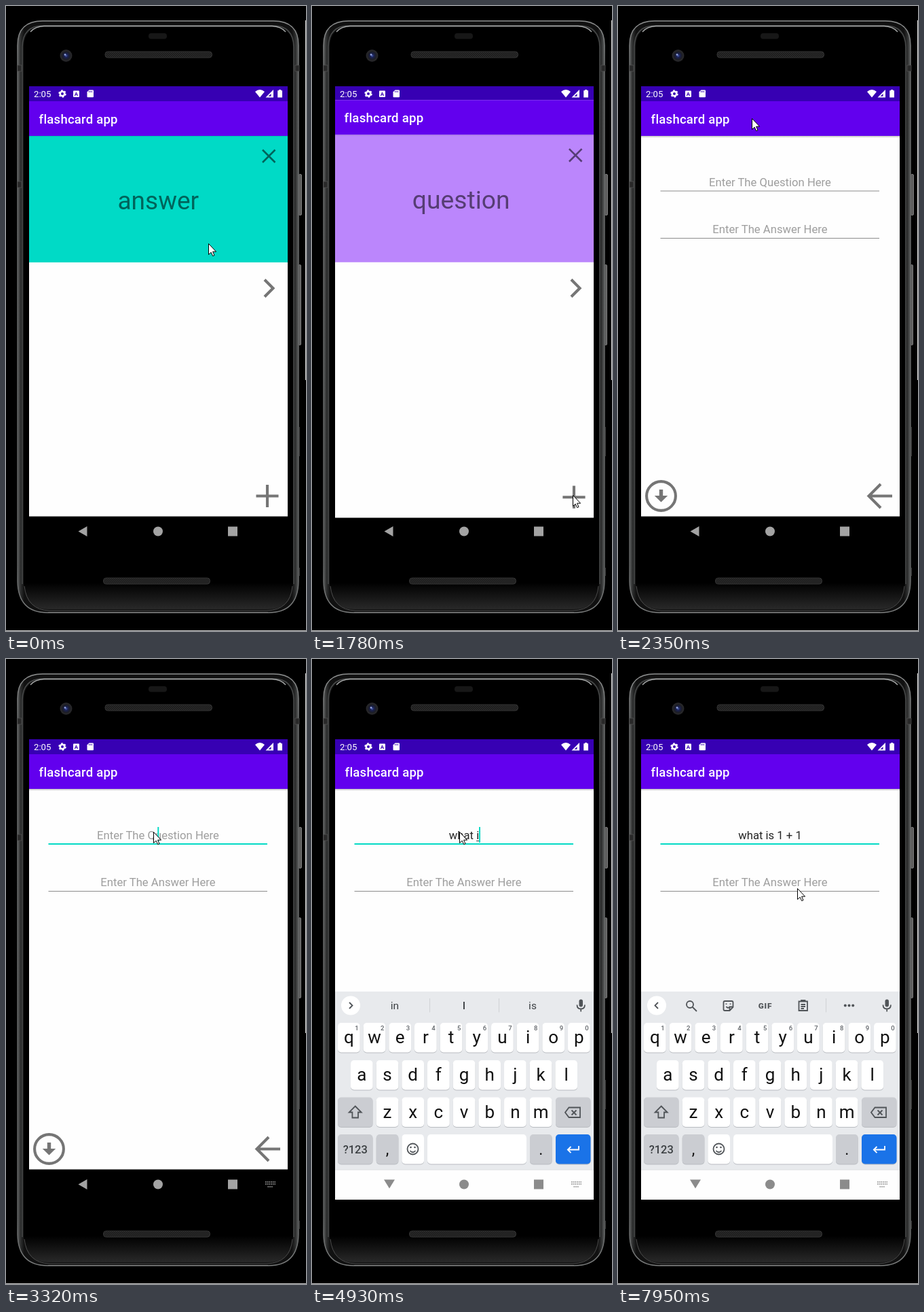
These frames come from a looping animation (442x919 px, 8000 ms). An HTML page:

```html
<!DOCTYPE html>
<html lang="en">
<head>
<meta charset="utf-8">
<title>Flashcard app</title>
<style>
html, body { margin: 0; width: 100%; height: 100%; overflow: hidden; background: #000; }
svg { display: block; width: 442px; height: 919px; font-family: Roboto, sans-serif; }
.mid { text-anchor: middle; }
.line { fill: none; stroke: #757575; stroke-width: 4.1; }
.glyph { fill: none; stroke: #505458; stroke-width: 1.8; }
.hint { font-size: 16.67px; fill: #9e9e9e; }
</style>
</head>
<body>
<svg viewBox="0 0 442 919">
  <defs>
    <clipPath id="screen"><path d="M34 118H415V795H34Z"/></clipPath>
    <clipPath id="appClip"><path d="M34 118H415V764H34Z"/></clipPath>
    <linearGradient id="shell">
      <stop offset="0" stop-color="#5a5c5c"/><stop offset=".012" stop-color="#2b2c2c"/>
      <stop offset=".024" stop-color="#111"/><stop offset=".976" stop-color="#111"/>
      <stop offset=".988" stop-color="#2b2c2c"/><stop offset="1" stop-color="#5a5c5c"/>
    </linearGradient>
    <linearGradient id="rim" x1="0" x2="0" y1="0" y2="1">
      <stop offset="0" stop-color="#8d8f8f"/><stop offset=".08" stop-color="#666868"/>
      <stop offset=".92" stop-color="#5c5e5e"/><stop offset="1" stop-color="#7c7e7e"/>
    </linearGradient>
    <linearGradient id="chin" x1="0" x2="0" y1="0" y2="1">
      <stop offset="0" stop-color="#000"/><stop offset="1" stop-color="#292929"/>
    </linearGradient>
    <linearGradient id="shade" x1="0" x2="0" y1="0" y2="1">
      <stop offset="0" stop-opacity=".25"/><stop offset="1" stop-opacity="0"/>
    </linearGradient>
    <radialGradient id="lens">
      <stop offset="0" stop-color="#4a5fb4"/><stop offset=".4" stop-color="#1a2150"/><stop offset="1" stop-color="#1c1c1e"/>
    </radialGradient>
    <pattern id="mesh" width="3" height="3" patternUnits="userSpaceOnUse">
      <path d="M0 0H3V3H0Z" fill="#303030"/><path d="M0 0h1.5v1.5H0zM1.5 1.5H3V3H1.5z" fill="#161616"/>
    </pattern>
    <g id="bars">
      <path d="M34 118H415V140H34Z" fill="#3700b3"/>
      <path d="M34 140H415V191H34Z" fill="#6200ee"/>
      <text x="48.600" y="173" font-size="18.520" font-weight="500" letter-spacing=".23" fill="#fff">flashcard app</text>
    </g>
  </defs>

  <g id="phone">
    <path d="M441 21h1v529h-1z" fill="#e8e8e8"/>
    <path d="M0 918H442v1H0z" fill="#ccc"/>
    <g fill="#5e5e5e" stroke="#7a7a7a">
      <rect x="431" y="247.500" width="4.500" height="60" rx="1.500"/>
      <rect x="431" y="380.500" width="3.500" height="118" rx="1.500"/>
    </g>
    <path d="M432.500 619v43M432.500 826v12" stroke="#3a3a3a"/>
    <path d="M17 58Q17 22 54 22H394Q431 22 431 58V846Q430 892 387 892H61Q18 892 17 846Z" fill="url(#shell)" stroke="url(#rim)" stroke-width="1.500"/>
    <path d="M24 850V60Q25 29 54 29H394Q423 29 424 60V850" fill="none" stroke="#484a4a" stroke-width="1.500"/>
    <path d="M26 60Q27 31 55 31H393Q422 31 423 60V850H26Z"/>
    <path d="M36 38Q43 30 56 29.500H392Q405 30 412 38" fill="none" stroke="#a9abab" stroke-width="1.300"/>
    <path d="M26 848H423Q422 887 385 887H63Q27 887 26 848Z" fill="url(#chin)"/>
    <path d="M27 853Q31 888 64 889H384Q419 888 422 853" fill="none" stroke="#4b4b4b"/>
    <path d="M62 891.500H386" stroke="#777"/>
    <path d="M17 87h6v9h-6zM17 258h6v9h-6zM426 87h6v9h-6z" fill="#292929" stroke="#555" stroke-width=".7"/>
    <rect x="210" y="40" width="27" height="8.500" rx="4" fill="#171717"/>
    <rect x="146" y="67" width="157.500" height="9" rx="4" fill="url(#mesh)" stroke="#333"/>
    <rect x="143.500" y="841" width="157" height="9" rx="4" fill="url(#mesh)" stroke="#333"/>
    <circle cx="88.500" cy="73" r="9" fill="#262629"/>
    <circle cx="88.500" cy="73" r="6.500" fill="url(#lens)"/>
    <circle cx="87" cy="71.500" r="1.300" fill="#a3b1e6"/>
  </g>

  <g clip-path="url(#appClip)">
    <g id="deck">
      <path d="M34 118H415V750.500H34Z" fill="#fefefe"/>
      <use href="#bars"/>
      <path id="card" d="M34 191H415V377H34Z"/>
      <path d="M34 191H415v2H34z" fill="url(#shade)" opacity=".5"/>
      <text id="cardText" class="mid" y="299" font-size="37" fill-opacity=".54"></text>
      <path d="M378 211.500L396.500 230M396.500 211.500L378 230" fill="none" stroke="#000" stroke-opacity=".54" stroke-width="2.600"/>
      <path class="line" d="M381 402.500L393.500 415L381 427.500"/>
      <path class="line" d="M368.500 720.500H401.500M385 704V737"/>
    </g>
    <g id="editor">
      <path d="M34 118H415V750.500H34Z" fill="#fefefe"/>
      <use href="#bars"/>
      <path d="M34 191H415v3H34z" fill="url(#shade)"/>
      <text id="questionHint" class="mid hint" x="224" y="265">Enter The Question Here</text>
      <text class="mid hint" x="224" y="334">Enter The Answer Here</text>
      <path id="underline" d="M62.500 272H385"/>
      <path d="M62.500 341.500H385" stroke="#8c8c8c"/>
      <text id="typed" class="mid" x="224" y="265" font-size="16.670" fill="#252525"></text>
      <path id="compose" stroke="#333"/>
      <path id="caret" stroke="#03dac5" stroke-width="2"/>
      <circle class="line" cx="63.500" cy="720.500" r="21.400"/>
      <path d="M60.800 711h5.400v9h7l-9.700 9.500-9.700-9.500h7z" fill="#757575"/>
      <path class="line" d="M404 720.500H369M387 703L369.500 720.500L387 738"/>
    </g>
  </g>

  <g id="status" fill="#fff">
    <text x="41" y="133.800" font-size="13.200">2:05</text>
    <circle cx="83" cy="129" r="3.300" fill="none" stroke="#fff" stroke-width="2.600"/>
    <circle cx="83" cy="129" r="4.900" fill="none" stroke="#fff" stroke-width="1.700" stroke-dasharray="2.570"/>
    <rect x="99" y="124.500" width="9" height="9.500" rx="1"/>
    <text class="mid" x="103.500" y="132.300" font-size="8" font-weight="700" fill="#3700b3">A</text>
    <path d="M122.500 123.500h5.500q1 0 1 1v8.700q0 1-1 1h-7.500q-1 0-1-1V126.500z"/>
    <path d="M122.500 125v2M124.500 125v2M126.500 125v2" stroke="#3700b3" stroke-width=".9"/>
    <path d="M367 126q7-6 14 0l-7 8.500z"/>
    <path d="M394 123v11.500H382.500z"/><path d="M390.500 129v3.800h-4z" fill="#3700b3"/>
    <path d="M402 123h3.200v1.300h1.800v10.200h-6.800V124.300h1.800z"/>
  </g>

  <g clip-path="url(#screen)">
    <path id="navPaper" d="M34 750.500H415V795H34Z" fill="#fefefe"/>
    <g id="keyboard">
      <path d="M34 489H415V751H34Z" fill="#e8eaed"/>
      <path d="M34 751H415V796H34Z" fill="#fefefe"/>
      <path d="M34 751H415" stroke="#dcdee0"/>
      <circle cx="57" cy="509.500" r="14" fill="#fff"/>
      <path id="toggle" class="glyph"/>
      <g id="tools" class="glyph">
        <circle cx="106" cy="508" r="5"/><path d="M109.500 511.500L116 518"/>
        <path d="M157.500 503h10q2 0 2 2v7l-5 5h-7q-2 0-2-2v-10q0-2 2-2zM169.500 511.500h-5v5M159.500 511q2 3 4.500 1M159.500 506.500v1.500M165.500 506.500v1.500"/>
        <path d="M266.500 503.500h12.500v13.500h-12.500zM270 503.500v-1.500h5.500v1.500M269.500 508h6.500M269.500 511h6.500M269.500 514h4.500"/>
        <path d="M306.500 499v20.500" stroke="#d0d2d5" stroke-width="1"/>
        <g fill="#505458" stroke="none">
          <text class="mid" x="217" y="513.800" font-size="11.800" font-weight="900" letter-spacing=".8">GIF</text>
          <circle cx="334.800" cy="509.500" r="2"/><circle cx="340.500" cy="509.500" r="2"/><circle cx="346.200" cy="509.500" r="2"/>
        </g>
      </g>
      <g id="words" class="mid" font-size="15.500" fill="#3c4043">
        <path d="M173.500 499v20.500M275.500 499v20.500" stroke="#d0d2d5"/>
        <text x="122" y="515"></text><text x="224" y="515" font-weight="500"></text><text x="325" y="515"></text>
      </g>
      <rect x="393.500" y="500.500" width="5.500" height="11" rx="2.700" fill="#505458"/>
      <path class="glyph" d="M390.500 508.500q0 6 5.700 6t5.700-6M396.200 514.500v4"/>
      <g id="keys"></g>
      <g class="glyph">
        <path d="M63.700 657.500l9 9h-4.700v8h-8.600v-8h-4.700z"/>
        <path d="M378.500 659.500h16.500v14.500H378.500l-5.500-7.200zM382.500 663.500l7 7M389.500 663.500l-7 7"/>
        <circle cx="148.500" cy="720.500" r="8"/><path d="M144.500 723q4 4.500 8 0"/>
        <path d="M393 716v5.500H377M381.500 717l-4.700 4.600 4.700 4.600" stroke="#fff"/>
      </g>
      <circle cx="145.500" cy="718" r="1.300" fill="#505458"/><circle cx="151.500" cy="718" r="1.300" fill="#505458"/>
    </g>
    <g id="nav">
      <path id="back"/>
      <circle cx="224" cy="772.500" r="7"/><path d="M327 765.500h14v14h-14z"/>
      <path id="imeIcon" d="M382 769h15M382 772h15M385.500 776h8" fill="none" stroke-width="1.700" stroke-dasharray="1.700 1"/>
    </g>
  </g>
  <path id="pointer" d="M.5 .5V16.500L4.200 13.200L6.700 18.600L9 17.600L6.600 12.200H11.600Z" fill="#fff" stroke="#000"/>
</svg>

<script>
const LOOP = 8000;
const $ = id => document.getElementById(id);
const show = (id, on) => { $(id).style.display = on ? '' : 'none'; };

// Each row: start time, then the value held until the next row.
const pointerSteps = [
  [0, 298, 349], [270, 303, 371], [420, 314, 425], [540, 331, 500], [690, 350, 580],
  [810, 365, 640], [990, 377, 687], [1140, 382, 704], [1260, 383, 712], [1380, 384, 719],
  [2020, 345, 600], [2140, 260, 350], [2230, 215, 220], [2350, 197, 165], [2470, 203, 192],
  [2620, 211, 235], [2740, 215, 254], [2890, 217, 254], [7680, 223, 266], [7800, 247, 311], [7950, 264, 337]
];
// deck scale, editor scale, editor opacity
const openSteps = [[0, 1, 1, 0], [1780, 1.006, .85, 0], [1900, 1.044, .94, .9], [2020, 1.044, .988, 1], [2140, 1, 1, 1]];
const slideSteps = [[0, 310], [3440, 165], [3560, 32], [3680, 0]];
const typedSteps = [
  [0, ''], [3960, 'w'], [4110, 'wh'], [4230, 'wha'], [4380, 'what'], [4810, 'what '],
  [4930, 'what i'], [5050, 'what is'], [5320, 'what is '], [6000, 'what is 1'], [6400, 'what is 1 '],
  [6520, 'what is 1 +'], [7000, 'what is 1 + '], [7120, 'what is 1 + 1']
];
const wordSteps = [
  [0, ''], [4110, 'why|what|who'], [4500, "what's|what|whats"], [4810, 'the|is|are'], [4930, 'in|I|is'],
  [5050, "isn't|is|it"], [5320, 'your|the|a'], [6280, ''], [6400, 'of|and|to'], [6520, ''],
  [7000, 'the|a|and'], [7400, '']
];
const caretSteps = [[0, 0], [3170, 1], [3680, 0], [3960, 1], [5050, 0], [5720, 1], [7950, 0]];
const at = (steps, t) => steps.findLast(row => row[0] <= t).slice(1);

function buildKeys() {
  let out = '';
  const key = (x, y, w, label = '', fill = '#fff', size = 26) => {
    out += `<rect x="${x}" y="${y + 1}" width="${w}" height="43.500" rx="5" fill="#b9bcc1"/>` +
      `<rect x="${x}" y="${y}" width="${w}" height="43.500" rx="5" fill="${fill}"/>` +
      `<text class="mid" x="${x + w / 2}" y="${y + (size < 20 ? 28 : 30)}" font-size="${size}"` +
      `${size < 20 ? ' font-weight="500" fill="#3c4043"' : ' fill="#111"'}>${label}</text>`;
  };
  const pitch = 37.67, grey = '#cbcdd2';
  [['qwertyuiop', 38, 535], ['asdfghjkl', 57, 590], ['zxcvbnm', 94.7, 644.5]].forEach(([letters, x, y], row) =>
    [...letters].forEach((c, i) => {
      key(x + pitch * i, y, 32.7, c);
      if (!row) out += `<text class="mid" x="${x + pitch * i + 28}" y="546" font-size="9.500" font-weight="500" fill="#5f6368">${(i + 1) % 10}</text>`;
    }));
  key(38, 644.5, 51.5, '', grey);
  key(359, 644.5, 51.5, '', grey);
  key(38, 699, 51.5, '?123', grey, 16.5);
  key(94.7, 699, 32.7, ',', grey, 23);
  key(132.3, 699, 32.7);
  key(170, 699, 146);
  key(321, 699, 32.7, '.', grey, 23);
  key(359, 699, 51.5, '', '#1a73e8');
  $('keys').innerHTML = out;
}

const zoom = s => `translate(224.500 434) scale(${s}) translate(-224.500 -434)`;

function drawDeck(t) {
  const [deckScale, editorScale, opacity] = at(openSteps, t);
  const flipped = t >= 150;
  $('card').setAttribute('fill', flipped ? '#bb86fc' : '#00dac6');
  $('cardText').textContent = flipped ? 'question' : 'answer';
  $('cardText').setAttribute('x', flipped ? 219.7 : 224.3);
  $('deck').setAttribute('transform', zoom(deckScale));
  $('editor').setAttribute('transform', zoom(editorScale));
  $('editor').setAttribute('opacity', opacity);
  show('deck', t < 2140);
  show('editor', opacity > 0);
}

function drawField(t) {
  const [text] = at(typedSteps, t), [caretOn] = at(caretSteps, t);
  const focused = t >= 3170, trimmed = text.trimEnd();
  $('typed').textContent = trimmed;
  const width = trimmed ? $('typed').getComputedTextLength() : 0;
  const caretX = 224.3 + (trimmed ? width / 2 + .5 : 0) + (text.length - trimmed.length) * 4;
  $('caret').setAttribute('d', `M${caretX} 247V270`);
  show('caret', caretOn);
  show('questionHint', !text);
  $('underline').setAttribute('stroke', focused ? '#03dac5' : '#8c8c8c');
  $('underline').setAttribute('stroke-width', focused ? 2 : 1);

  const composing = t >= 4110 && t < 5320 && text === trimmed;
  show('compose', composing);
  if (composing) {
    const start = text.lastIndexOf(' ') + 1;
    const from = 224 - width / 2 + (start ? $('typed').getSubStringLength(0, start) : 0);
    $('compose').setAttribute('d', `M${from} 267.500H${224 + width / 2}`);
  }
}

function drawKeyboard(t) {
  const [words] = at(wordSteps, t);
  const up = t >= 3440, navColor = up ? '#8b8b8b' : '#a3a3a3';
  show('keyboard', up);
  show('navPaper', up);
  $('keyboard').setAttribute('transform', `translate(0 ${at(slideSteps, t)[0]})`);
  show('tools', !words);
  show('words', words);
  const labels = words.split('|');
  $('words').querySelectorAll('text').forEach((el, i) => { el.textContent = labels[i] || ''; });
  $('toggle').setAttribute('d', words ? 'M55 505l4.500 4.500-4.500 4.500' : 'M59 505l-4.500 4.500 4.500 4.500');
  $('back').setAttribute('d', up ? 'M106 765.500H122L114 778.500Z' : 'M106.500 772.500L119.500 765V780Z');
  $('nav').setAttribute('fill', navColor);
  $('imeIcon').setAttribute('stroke', navColor);
  show('imeIcon', t >= 3320);
}

function frame() {
  const t = performance.now() % LOOP;
  drawDeck(t);
  drawField(t);
  drawKeyboard(t);
  $('pointer').setAttribute('transform', `translate(${at(pointerSteps, t).join(' ')})`);
  requestAnimationFrame(frame);
}

buildKeys();
frame();
</script>
</body>
</html>
```
